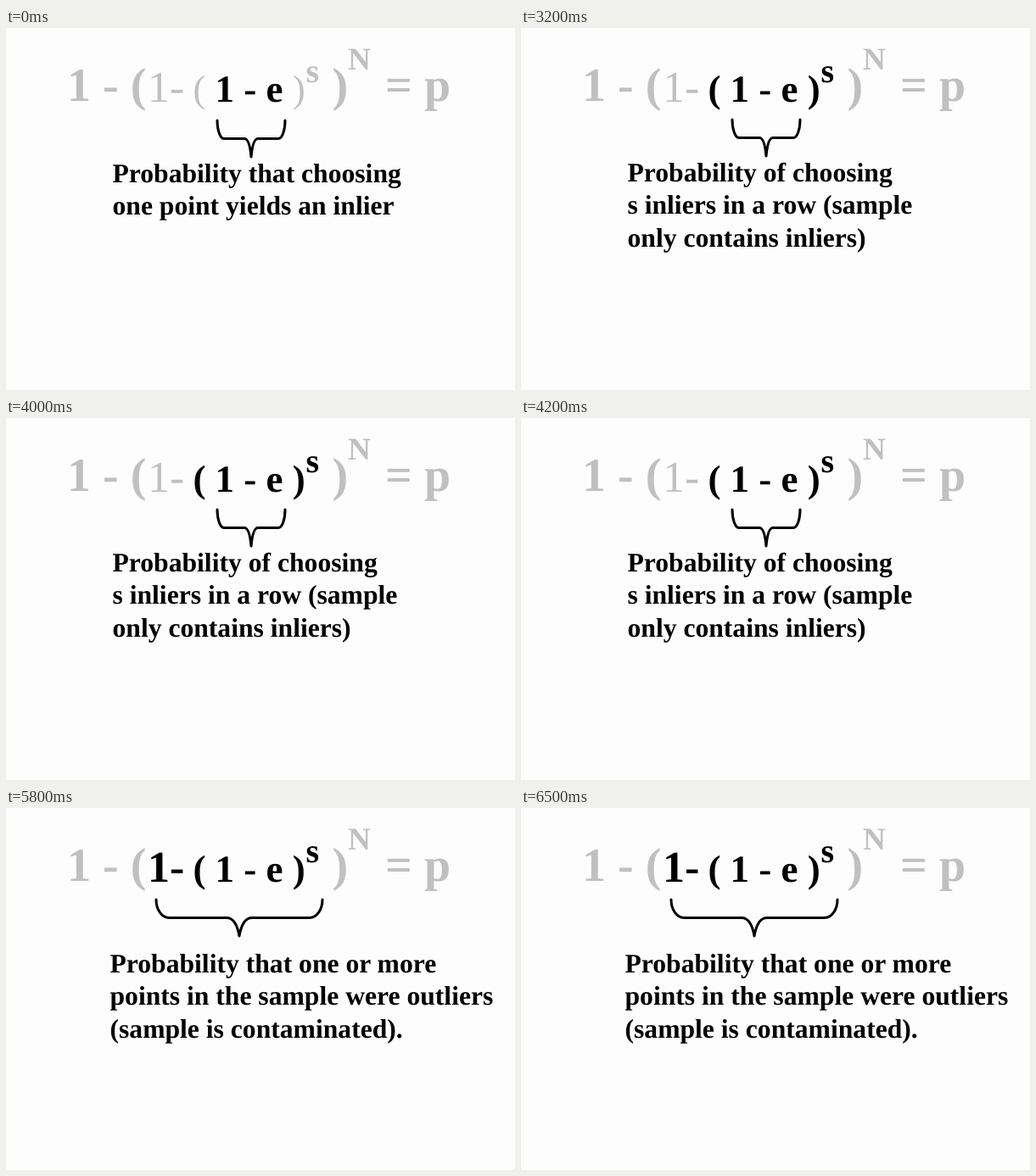
An HTML page that plays this animation: 600x427 px, repeating every 8000 ms.

```html
<!DOCTYPE html>
<html lang="en">
<head>
<meta charset="utf-8">
<title>Sampling probability</title>
<style>
  html, body { margin: 0; width: 100%; height: 100%; overflow: hidden; background: #fefdfe; }
  svg { display: block; width: 100%; height: 100%; }
  text {
    font-family: "Liberation Serif", "Times New Roman", serif;
    font-weight: bold;
    text-rendering: geometricPrecision;
  }
  path { fill: none; stroke: #000; stroke-width: 3; stroke-linecap: round; stroke-linejoin: round; }
</style>
</head>
<body>
<svg id="stage" viewBox="0 0 600 427"></svg>
<script>
const LOOP = 8000;
const GREY = "#c0c0c0";
const BLACK = "#000";
const stage = document.getElementById("stage");

const scenes = [
  {
    start: 0, lit: ["base"],
    brace: { left: 249, right: 329, top: 109, radius: 8 },
    x: 125.5, y: 182,
    lines: ["Probability that choosing", "one point yields an inlier"]
  },
  {
    start: 3200, lit: ["base", "power"],
    brace: { left: 249, right: 329, top: 108, radius: 8 },
    x: 125.5, y: 181,
    lines: ["Probability of choosing", "s inliers in a row (sample", "only contains inliers)"]
  },
  {
    start: 5800, lit: ["base", "power", "complement"],
    brace: { left: 177, right: 373, top: 108, radius: 15 },
    x: 122.5, y: 194,
    lines: ["Probability that one or more", "points in the sample were outliers", "(sample is contaminated)."]
  }
];

// text, x, baseline, size, part, thin while dimmed
const formula = [
  ["1 - (", 72, 85.5, 56, "frame"],
  ["1-", 167, 87, 52, "complement", true],
  ["(", 220.6, 87, 45, "power", true],
  ["1 - e", 246.6, 87, 45, "base"],
  [")", 337.8, 87, 45, "power", true],
  ["s", 353.4, 63.5, 40, "power"],
  [")", 384.5, 85.5, 56, "frame"],
  ["N", 403, 48.5, 37.3, "frame"],
  ["= p", 447, 85.5, 56, "frame"]
];

function add(parent, tag, attrs, content = "") {
  const node = document.createElementNS("http://www.w3.org/2000/svg", tag);
  for (const name in attrs) node.setAttribute(name, attrs[name]);
  node.textContent = content;
  return parent.appendChild(node);
}

function bracePath({ left, right, top, radius: r }) {
  const h = 21.5;
  const mid = (left + right) / 2;
  const corner = dy => `a${r} ${h} 0 0 0 ${r} ${dy}`;
  return `M${left} ${top}${corner(h)}H${mid - r}q${r * 0.75} 0 ${r} ${h}` +
         `q${r * 0.25} ${-h} ${r} ${-h}H${right - r}${corner(-h)}`;
}

function buildScene(scene) {
  const group = add(stage, "g", {});
  for (const [label, x, y, size, part, thin] of formula) {
    const lit = scene.lit.includes(part);
    const style = thin && !lit ? "font-weight: normal" : "";
    add(group, "text", { x, y, "font-size": size, fill: lit ? BLACK : GREY, style }, label);
  }
  add(group, "path", { d: bracePath(scene.brace) });
  scene.lines.forEach((line, i) =>
    add(group, "text", { x: scene.x, y: scene.y + i * 38.4, "font-size": 31.64 }, line));
  return group;
}

const groups = scenes.map(buildScene);

function draw(now) {
  const time = now % LOOP;
  const current = scenes.findLastIndex(scene => time >= scene.start);
  groups.forEach((group, i) => { group.style.display = i === current ? "" : "none"; });
}

const origin = performance.now();
function tick() {
  draw(performance.now() - origin);
  requestAnimationFrame(tick);
}
tick();
</script>
</body>
</html>
```
